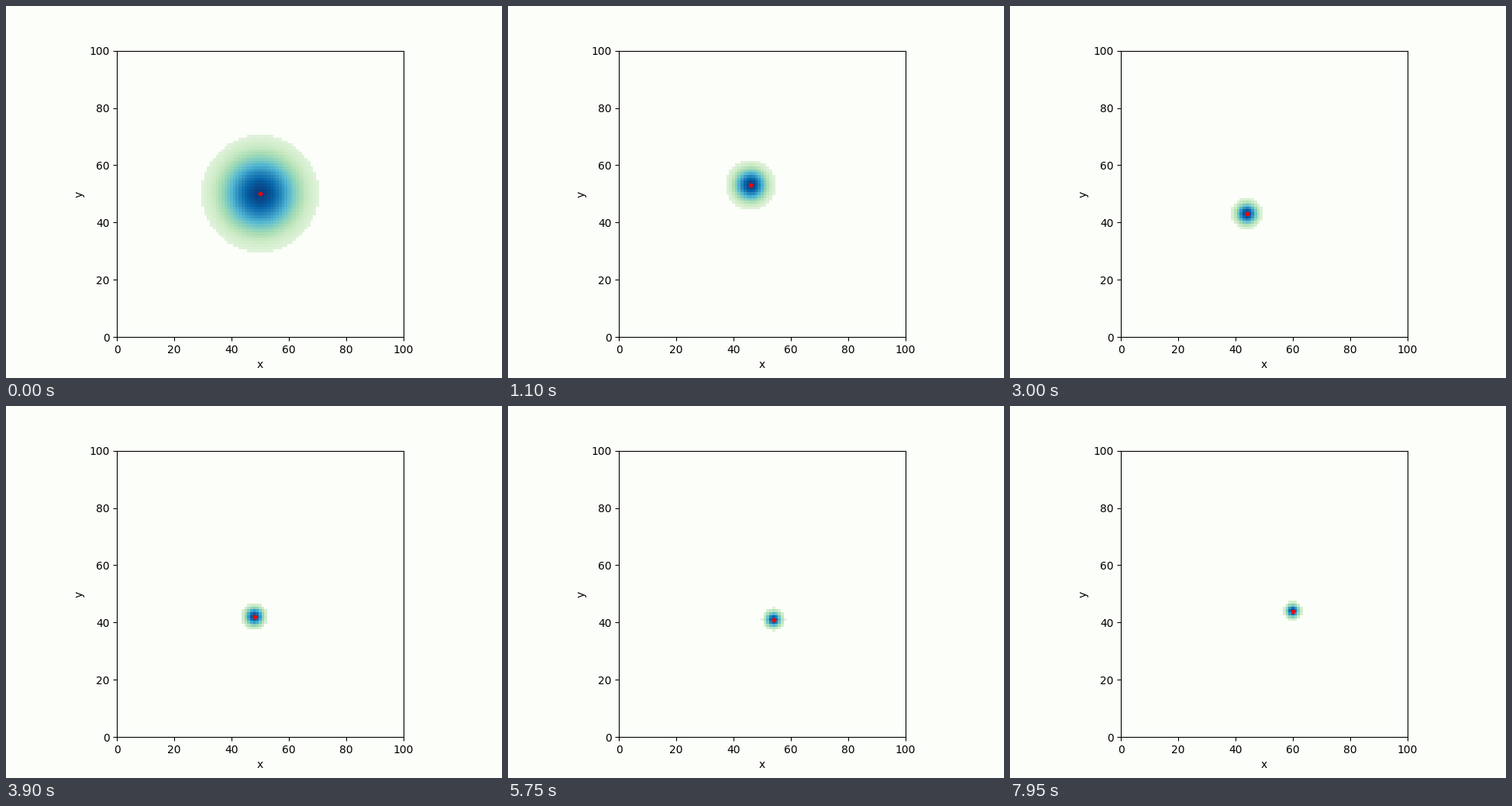
A matplotlib script for the animation above (8000 ms loop, 640 by 480 pixels).

```python
import random

import matplotlib.pyplot as plt
import numpy as np
from matplotlib.animation import FuncAnimation

FRAMES, INTERVAL = 160, 50
PAPER = "#fcfef9"
CUTOFF = np.exp(-2.05 ** 2 / 2)

# (step, x, y) key points of the wandering estimate
STOPS = [
    (0, 50, 50), (22, 46, 53), (30, 44, 47), (38, 47, 50), (50, 43, 45),
    (60, 44, 43), (68, 46, 41), (85, 49, 41), (97, 55, 42), (110, 54, 40),
    (134, 59, 46), (147, 59, 49), (159, 60, 44),
]


def clamp(value, low, high):
    return max(low, min(high, value))


def walk(pos, end, steps, rng):
    """Random unit steps from pos that arrive at end in time."""
    out = []
    for left in range(steps, 0, -1):
        gap = end - pos
        step = clamp(round(gap / left + rng.gauss(0, 0.4)), -1, 1)
        pos += clamp(step, gap - left + 1, gap + left - 1)
        out.append(pos)
    return out


def make_path():
    rng = random.Random(4)
    path = [STOPS[0][1:]]
    for (n0, x0, y0), (n1, x1, y1) in zip(STOPS, STOPS[1:]):
        xs = walk(x0, x1, n1 - n0, rng)
        ys = walk(y0, y1, n1 - n0, rng)
        path += zip(xs, ys)
    return path


PATH = make_path()
gx, gy = np.meshgrid(np.arange(100), np.arange(100))


def belief(n):
    """Gaussian that narrows by a fixed precision each step."""
    x, y = PATH[n]
    precision = 0.01 + 0.0021 * n
    p = np.exp(-((gx - x) ** 2 + (gy - y) ** 2) * precision / 2)
    return np.ma.masked_less(p, CUTOFF)


fig, ax = plt.subplots(figsize=(6.4, 4.8), dpi=100, facecolor=PAPER)
ax.set_facecolor(PAPER)
image = ax.imshow(belief(0), cmap="GnBu", vmin=0, vmax=1, origin="lower",
                  interpolation="nearest")
dot, = ax.plot([], [], "r.", markersize=6)
ax.set(xlim=(0, 100), ylim=(0, 100), xlabel="x", ylabel="y",
       xticks=range(0, 101, 20), yticks=range(0, 101, 20))


def draw(n):
    x, y = PATH[n]
    image.set_data(belief(n))
    dot.set_data([x], [y])
    return image, dot


anim = FuncAnimation(fig, draw, frames=FRAMES, interval=INTERVAL,
                     repeat=True, repeat_delay=0)
plt.show()
```
